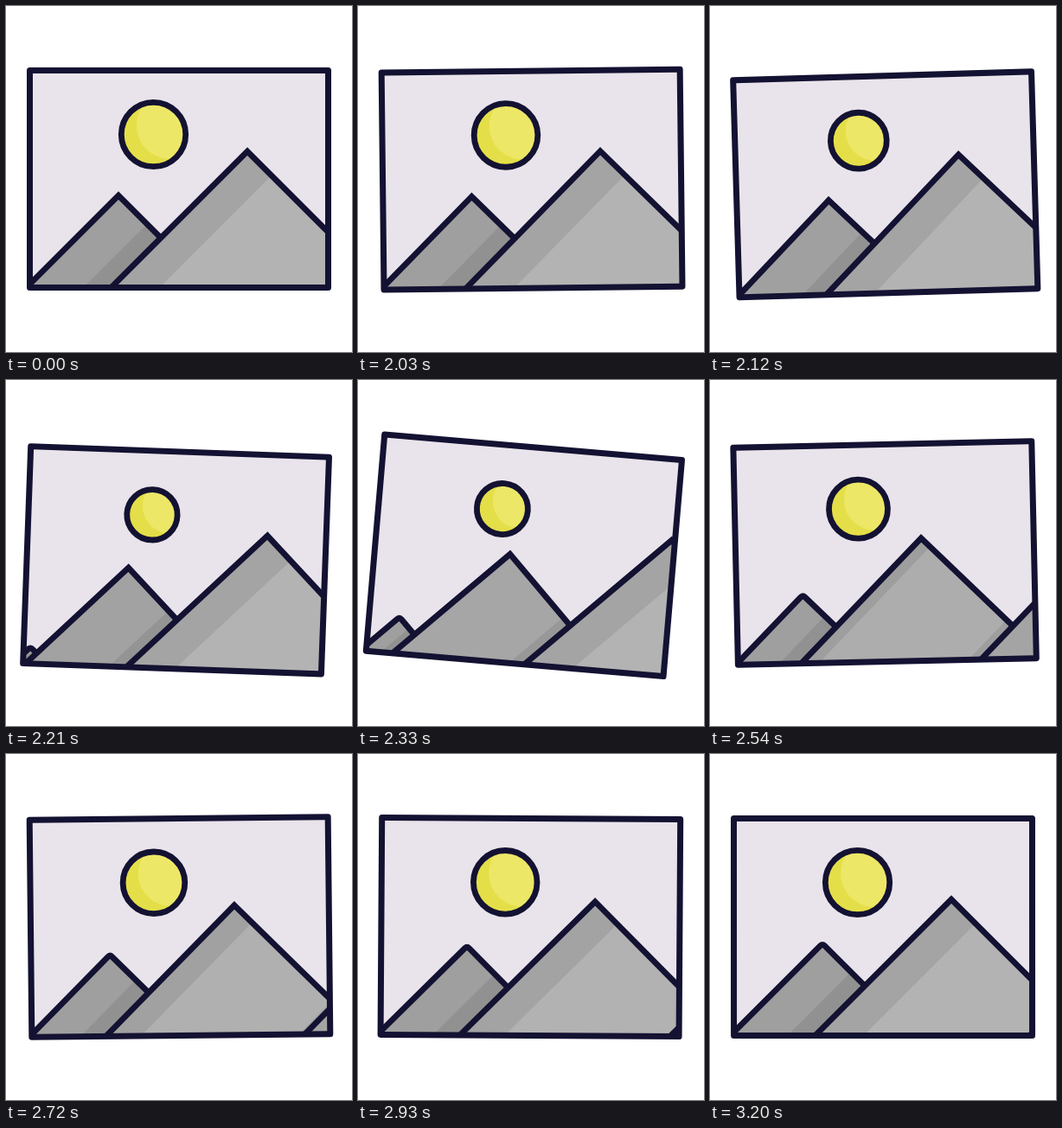
Animation of 400x400 px, one loop 3230 ms. Source, as an HTML page:

```html
<!DOCTYPE html>
<html lang="en">
<head>
<meta charset="utf-8">
<title>Swinging picture</title>
<style>
  html, body { margin: 0; width: 100%; height: 100%; overflow: hidden; background: #fff; }
  svg { display: block; width: 100vw; height: 100vh; }
  .line { fill: none; stroke: #141232; stroke-width: 6.8; stroke-linecap: round; }
  .shade { fill: #000; fill-opacity: .085; }
</style>
</head>
<body>
<svg viewBox="0 0 400 400">
  <defs>
    <clipPath id="inside"><rect x="27.5" y="74.5" width="345" height="251"/></clipPath>
    <clipPath id="disc"><circle id="cut"/></clipPath>
  </defs>
  <g id="picture">
    <rect x="27.5" y="74.5" width="345" height="251" fill="#e9e4eb"/>
    <g transform="translate(170.5 148.5)">
      <g clip-path="url(#disc)">
        <circle r="40" fill="#e4df48"/>
        <circle id="light" cx="19.5" cy="-10.5" fill="#ede767"/>
      </g>
      <circle id="rim" class="line"/>
    </g>
    <g id="range" clip-path="url(#inside)"></g>
    <rect class="line" x="27.5" y="74.5" width="345" height="251" style="stroke-width:7" stroke-linejoin="round"/>
  </g>
</svg>
<script>
const LOOP = 3230, START = 2030, STEP = 30, MOVE = 2000, FLOOR = 345;
const $ = id => document.getElementById(id);
const lerp = (a, b, k) => a + (b - a) * k;

// Ease curve with flat ends; a and b are the horizontal handles.
function ease(a, b) {
  return u => {
    if (u <= 0) return 0;
    if (u >= 1) return 1;
    let lo = 0, hi = 1, s = .5;
    for (let i = 0; i < 24; i++) {
      s = (lo + hi) / 2;
      const x = 3 * s * (1 - s) ** 2 * a + 3 * s * s * (1 - s) * b + s ** 3;
      if (x < u) lo = s; else hi = s;
    }
    return s * s * (3 - 2 * s);
  };
}
const slide = ease(.4, .1), rise = ease(.27, .27), grow = ease(.36, .17);
const swing = ease(.33, .5), settle = ease(.2, .1);

// Each key: time, value, and the curve that leads to it (swing by default).
function track(keys, t) {
  if (t <= keys[0][0]) return keys[0][1];
  for (let i = 1; i < keys.length; i++) {
    const [t0, v0] = keys[i - 1], [t1, v1, curve = swing] = keys[i];
    if (t <= t1) return lerp(v0, v1, curve((t - t0) / (t1 - t0)));
  }
  return keys[keys.length - 1][1];
}

const TILT = [[2000, 0], [2090, -2], [2335, 4.9], [2615, -2], [2850, .7], [3080, -.25], [3230, 0]];
const DROP = [[2000, 0], [2200, 8.4], [2560, 0, slide]];
const SHRINK = [[2000, 0], [2250, .205], [LOOP, 0, settle]];

function add(cls) {
  const p = document.createElementNS("http://www.w3.org/2000/svg", "path");
  if (cls) p.setAttribute("class", cls);
  $("range").appendChild(p);
  return p;
}

// soft: how far the peak is rounded off
function mountain(soft) {
  const body = add(), left = add("shade"), right = add("shade"), line = add("line");
  // dl, dr: where the shadow edges leave the right slope, measured from the peak
  return (x, y, grey, dl, dr) => {
    const h = FLOOR - y, g = Math.round(grey), top = y + soft;
    const slope = `M${x - h} ${FLOOR}L${x - soft} ${top}Q${x} ${y} ${x + soft} ${top}L${x + h} ${FLOOR}`;
    const sharp = `M${x - h} ${FLOOR}L${x} ${y}L${x + h} ${FLOOR}`;
    body.setAttribute("d", slope + "Z");
    body.setAttribute("fill", `rgb(${g},${g},${g})`);
    line.setAttribute("d", soft ? slope : sharp);
    left.setAttribute("d", dl > 0
      ? `M${x - h} ${FLOOR}L${x} ${y}L${x + dl} ${y + dl}L${x + 2 * dl - h} ${FLOOR}Z` : "");
    right.setAttribute("d", dr < h
      ? `M${x + dr} ${y + dr}L${x + h} ${FLOOR}L${x + 2 * dr - h} ${FLOOR}Z` : "");
  };
}
const back = mountain(2.5), middle = mountain(0), front = mountain(0);

function draw(t) {
  const u = (t - MOVE) / (LOOP - MOVE);
  const p = slide(u), q = rise(u);
  $("picture").setAttribute("transform",
    `translate(0 ${track(DROP, t)}) rotate(${track(TILT, t)} 200 105)`);

  back(lerp(24.7, 130, p), lerp(318, 219, grow(u)), 159, 0, 33 * p);
  middle(lerp(130, 279, p), lerp(219, 168, q), lerp(159, 179, q), 72 * p - 44, 33 + 92 * q);
  front(279 + 248 * p, 168, 179, 28, 999);

  // Outline weight and the crescent's width stay the same while the sun shrinks.
  const r = 37.2 - 40.6 * track(SHRINK, t);
  $("rim").setAttribute("r", r);
  $("cut").setAttribute("r", r);
  $("light").setAttribute("r", r + 1.8);
}

const origin = performance.now();
function tick() {
  const t = (performance.now() - origin) % LOOP;
  draw(t < START ? MOVE : START + STEP * Math.floor((t - START) / STEP));
  requestAnimationFrame(tick);
}
draw(MOVE);
requestAnimationFrame(tick);
</script>
</body>
</html>
```
